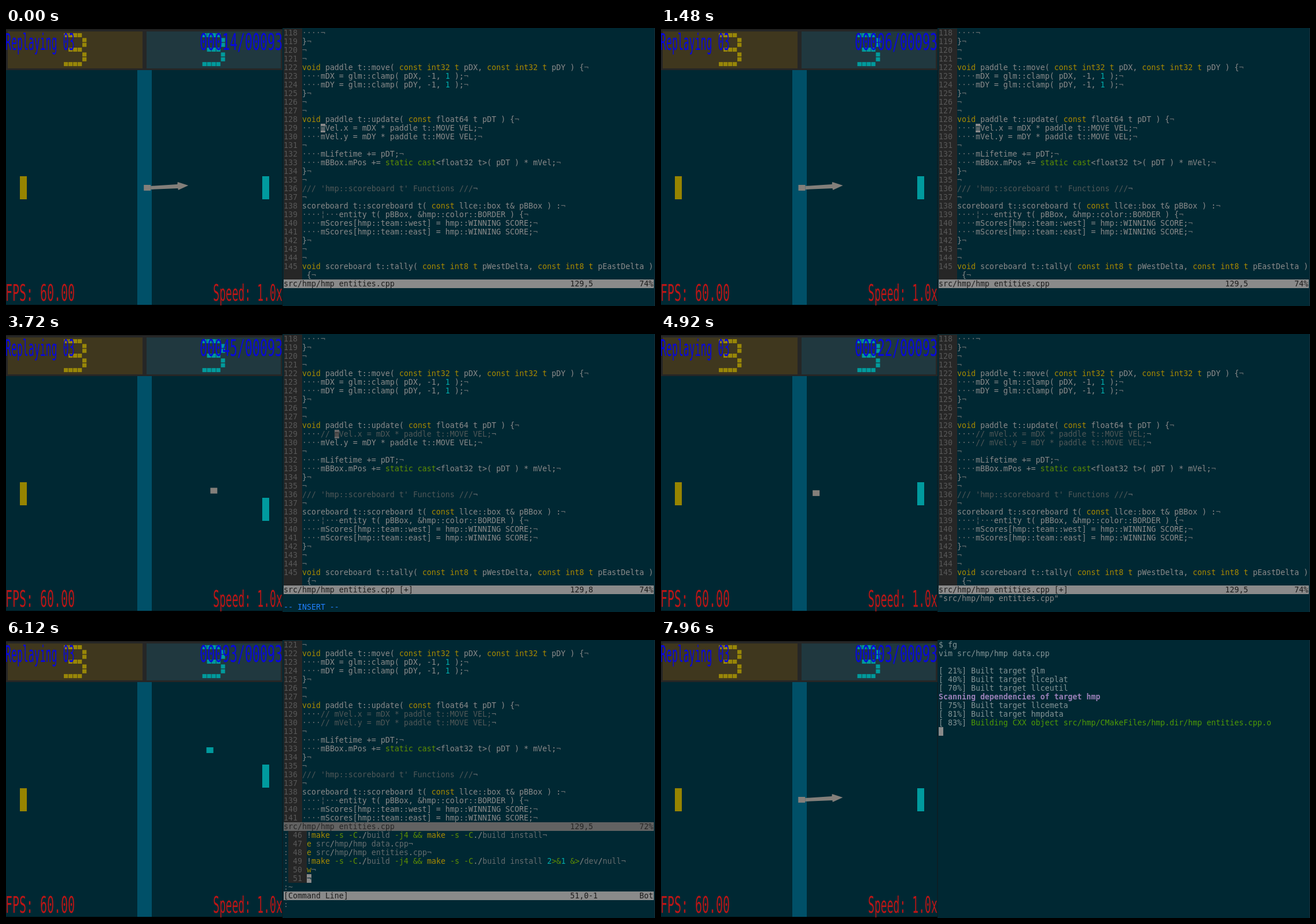
An HTML page that plays this animation: 1122 by 482 pixels, repeating every 8000 ms.

```html
<!DOCTYPE html>
<html lang="en">
<head>
<meta charset="utf-8">
<title>Replay loop beside a code editor</title>
<style>
html, body { margin: 0; width: 100%; height: 100%; overflow: hidden; background: #002833; }
#stage { position: absolute; left: 0; top: 0; width: 1122px; height: 482px; overflow: hidden; }
svg { position: absolute; left: 0; top: 0; }
svg text { font-family: "DejaVu Sans Mono", monospace; white-space: pre; }
#term {
  position: absolute; left: 480px; top: 1px; width: 640px; height: 480px;
  font: 13.288px/15px "DejaVu Sans Mono", monospace; color: #8a8a8a; white-space: pre;
}
#term div { height: 15px; overflow: hidden; }
#term i { position: absolute; width: 8px; height: 15px; overflow: hidden; font-style: normal; }
#term s { display: inline-block; height: 15px; vertical-align: top; text-decoration: none; background: #262626; color: #585858; }
.y { color: #a88a00; }
.g { color: #5f8f00; }
.n { color: #00afaf; }
.c { color: #505858; }
.d { color: #646c6e; }
.b { color: #2080ff; }
.shell { color: #839496; }
.done { color: #4e9a06; }
.scan { color: #9a80b8; font-weight: bold; }
#term .bar { background: #8a8a8a; color: #1c1c1c; }
#term .off { background: #626262; color: #262626; }
.cur { background: #8a8a8a; color: #002833; }
.soft { background: #686868; color: #262626; }
.sel { background: #484848; color: #8a8a8a; }
</style>
</head>
<body>
<div id="stage">
  <svg width="1122" height="482" viewBox="0 0 1122 482">
    <rect width="478" height="482" fill="#000"/>
    <rect y="2" width="478" height="71" fill="#262626"/>
    <rect x="3" y="6" width="233" height="64" fill="#3f371e"/>
    <rect x="243" y="6" width="232" height="64" fill="#20383f"/>
    <rect y="73" width="477" height="407" fill="#002833"/>
    <rect x="477" y="73" width="2" height="407" fill="#0b1f26"/>
    <rect x="1121" width="1" height="482" fill="#18303a"/>
    <rect x="227" y="73" width="25" height="407" fill="#005068"/>
    <g id="scores"></g>
    <rect x="24" y="257" width="12" height="40" fill="#968400"/>
    <rect id="paddle" x="443" y="257" width="12" height="40" fill="#009a9e"/>
    <g id="ball">
      <rect x="-6" y="-5" width="12" height="10"/>
      <path id="arrow" d="M6-3L52-6 52.5-10 71-4 53.5 4 53 1 6 3Z"/>
    </g>
    <g id="hud"></g>
  </svg>
  <div id="term"></div>
</div>
<script>
const $ = id => document.getElementById(id);
const LOOP = 8000, STEP = 40, LENGTH = 94, HIT = 64.6;

// Linear interpolation over [position, value] pairs
function track(keys, at) {
  let i = 1;
  while (i < keys.length - 1 && keys[i][0] < at) i++;
  const [a, va] = keys[i - 1], [b, vb] = keys[i];
  const k = Math.min(1, Math.max(0, (at - a) / (b - a)));
  return va + (vb - va) * k;
}

// ---- game ----
const THREE = ['1111.', '....1', '....1', '.111.', '....1', '....1', '1111.'];
const digit = (left, color) => THREE.map((row, r) => [...row].map((on, c) => on === '1'
  ? `<rect x="${left + c * 8}" y="${9 + r * 8.35}" width="7.2" height="7" fill="${color}"/>` : '').join('')).join('');
$('scores').innerHTML = digit(100, '#988608') + digit(339.5, '#009a9c');

// HUD glyphs share one cap height, whatever their advance
function hudText(text, x, base, advance, color) {
  const size = advance / 0.602, tall = 28 / (0.729 * size);
  return `<text transform="translate(${x} ${base}) scale(1 ${tall})" font-size="${size}" fill="${color}">${text}</text>`;
}
const BLUE = '#0808dc', RED = '#bc1616';
$('hud').innerHTML = hudText('Replaying 03', -1, 38, 9.95, BLUE) + hudText('', 335, 38, 13, BLUE) +
  hudText('FPS: 60.00', -1, 472.5, 12, RED) + hudText('Speed: 1.0x', 358, 472.5, 10.9, RED);
const counter = $('hud').children[1];

const CLOCK = [[0, 14], [1480, 100], [2680, 170], [3720, 233], [4920, 304], [6120, 375], [7960, 473], [8000, 475]];
const BALL_X = [[0, 243], [16, 244.4], [HIT, 437], [93, 352.5]];
const BALL_Y = [[0, 277], [16, 277], [HIT, 268], [93, 191]];
const PADDLE_Y = [[0, 257], [33, 257], [42, 284], [49, 284], [70, 216], [93, 216]];

function drawGame(t) {
  const f = Math.round(track(CLOCK, t)) % LENGTH;
  counter.textContent = String(f).padStart(5, '0') + '/00093';
  $('ball').setAttribute('transform', `translate(${track(BALL_X, f)} ${track(BALL_Y, f)})`);
  $('ball').setAttribute('fill', f > HIT ? '#009a9e' : '#837f7a');
  $('arrow').style.display = f < 16 ? '' : 'none';
  $('paddle').setAttribute('y', track(PADDLE_Y, f));
}

// ---- editor ----
const FIRST = 118, FILE = 'src/hmp/hmp_entities.cpp';
const CODE = `    
}


void paddle_t::move( const int32_t pDX, const int32_t pDY ) {
    mDX = glm::clamp( pDX, -1, 1 );
    mDY = glm::clamp( pDY, -1, 1 );
}


void paddle_t::update( const float64_t pDT ) {
    mVel.x = mDX * paddle_t::MOVE_VEL;
    mVel.y = mDY * paddle_t::MOVE_VEL;

    mLifetime += pDT;
    mBBox.mPos += static_cast<float32_t>( pDT ) * mVel;
}

/// 'hmp::scoreboard_t' Functions ///

scoreboard_t::scoreboard_t( const llce::box_t& pBBox ) :
    ¦   entity_t( pBBox, &hmp::color::BORDER ) {
    mScores[hmp::team::west] = hmp::WINNING_SCORE;
    mScores[hmp::team::east] = hmp::WINNING_SCORE;
}


void scoreboard_t::tally( const int8_t pWestDelta, const int8_t pEastDelta )`.split('\n');
const HISTORY = [
  '!make -s -C./build -j4 && make -s -C./build install',
  'e src/hmp/hmp_data.cpp',
  'e ' + FILE,
  '!make -s -C./build -j4 && make -s -C./build install 2>&1 &>/dev/null',
  'w',
  ''
];
const CPP = /(\/\/.*?)(?=¬)|\b(void|const|int\d+_t)\b|(static_cast)|(?<= )(1)(?= )|([·¬¦]+)/g;
const CPP_CLASS = ['c', 'y', 'g', 'n', 'd'];
const EX = /(\bmake\b|^[ew]\b)|(-[sCj]4?|&amp;&amp;|&gt;|&amp;)|\b([12])\b|(\b(?:build|install|src|dev|null|hmp\w*|cpp)\b)|(¬)/g;
const EX_CLASS = ['y', 'g', 'n', 'd', 'd'];

const esc = s => s.replace(/&/g, '&amp;').replace(/</g, '&lt;').replace(/>/g, '&gt;');
const paint = (s, rule, names) => esc(s).replace(rule, (m, ...groups) =>
  `<span class="${names[groups.findIndex(g => g !== undefined)]}">${m}</span>`);
const row = (html, cls = '') => `<div class="${cls}">${html}</div>`;
const cell = (r, c, ch, cls) => `<i class="${cls}" style="left:${c * 8}px;top:${r * 15}px">${ch}</i>`;
const gutter = n => `<s>${String(n).padStart(3)} </s>`;
const bar = (name, pos, part, cls = 'bar') => row(name.padEnd(62) + pos.padEnd(15) + part, cls);

function codeRows(from, to, { x = '', y = '', block = false }) {
  let out = '';
  for (let n = from; n <= to; n++) {
    const insert = n === 129 ? x : n === 130 ? y : '';
    let text = CODE[n - FIRST].replace(/^ +(¦ +)?/, lead => lead.replace(/ /g, '·') + insert);
    if (block && (n === 129 || n === 130)) text = text.replace('····', '    ');
    out += row(gutter(n) + paint(n === 145 ? text : text + '¬', CPP, CPP_CLASS));
  }
  return out;
}

function editor({ pos = '129,5', plus = false, cells = '', cmd = '', mode = '', size = '', ...edit }) {
  return codeRows(118, 145, edit) +
    row(gutter('') + ' {<span class="d">¬</span>') +
    bar(FILE + (plus ? ' [+]' : ''), pos, '74%') + row(cmd) +
    row(mode && `<span class="b">-- ${mode} --</span>${size.padStart(72 - mode.length - 6)}`) + cells;
}

const DONE = { x: '// ', y: '// ' };
function history(line) {
  const list = HISTORY.map((s, i) => row(`<span class="d">:</span><s> ${46 + i} </s>` + paint(s + '¬', EX, EX_CLASS)));
  const ch = (HISTORY[line - 46] || '¬')[0];
  return codeRows(121, 141, DONE) + bar(FILE, '129,5', '72%', 'off') + list.join('') +
    row('<span class="d">:~</span>') + bar('[Command Line]', `${line},${line === 51 ? '0-1' : '1'}`, 'Bot') +
    row(line === 51 ? '<span class="d">:</span>' : '') + cell(line - 24, 5, ch, 'cur');
}

const built = (pct, name) => `[ ${pct}%] Built target ${name}`;
const OUTPUT = [
  '$ fg', 'vim src/hmp/hmp_data.cpp', '',
  built(21, 'glm'), built(40, 'llceplat'), built(70, 'llceutil'),
  '<span class="scan">Scanning dependencies of target hmp</span>',
  built(75, 'llcemeta'), built(81, 'hmpdata'),
  `[ 83%] <span class="done">Building CXX object src/hmp/CMakeFiles/hmp.dir/hmp_entities.cpp.o</span>`
];
const shell = count => OUTPUT.slice(0, count).map(s => row(s, 'shell')).join('') + cell(count, 0, '', 'cur');

const onM = cell(11, 8, 'm', 'cur');
const typed = (x, col) => editor({
  x, plus: x !== '', pos: '129,' + (col - 3), mode: 'INSERT', cells: cell(11, col, 'm', x.length > 1 ? 'soft' : 'cur')
});
const onSlash = cell(11, 8, '/', 'soft');
const quoted = `"${FILE}"`;

const SCENES = [
  [0, () => editor({ cells: onM })],
  [2160, () => editor({ cells: onM, mode: 'VISUAL BLOCK', size: '1x1' })],
  [2440, () => editor({
    pos: '130,5', block: true, mode: 'VISUAL BLOCK', size: '2x1',
    cells: cell(11, 8, 'm', 'sel') + cell(12, 8, 'm', 'cur')
  })],
  [2960, () => typed('', 8)],
  [3320, () => typed('/', 9)],
  [3440, () => typed('//', 10)],
  [3600, () => typed('// ', 11)],
  [4080, () => editor({ ...DONE, plus: true, cells: onSlash })],
  [4520, () => editor({ ...DONE, plus: true, cmd: ':', cells: cell(30, 1, '', 'cur') })],
  [4680, () => editor({ ...DONE, plus: true, cmd: ':w', cells: cell(30, 2, '', 'cur') })],
  [4880, () => editor({ ...DONE, plus: true, cmd: quoted })],
  [4960, () => editor({ ...DONE, cmd: quoted + ' 193L, 5632C written', cells: onSlash })],
  [5640, () => history(51)],
  [6320, () => history(50)],
  [6480, () => history(49)],
  [6800, () => shell(2)],
  [6960, () => shell(6)],
  [7200, () => shell(9)],
  [7400, () => shell(10)]
];

let shown = -1;
function drawTerm(t) {
  let i = SCENES.length - 1;
  while (SCENES[i][0] > t) i--;
  if (i === shown) return;
  shown = i;
  $('term').innerHTML = SCENES[i][1]();
}

const start = performance.now();
function tick() {
  const t = Math.floor((performance.now() - start) % LOOP / STEP) * STEP;
  drawGame(t);
  drawTerm(t);
  requestAnimationFrame(tick);
}
tick();
</script>
</body>
</html>
```
